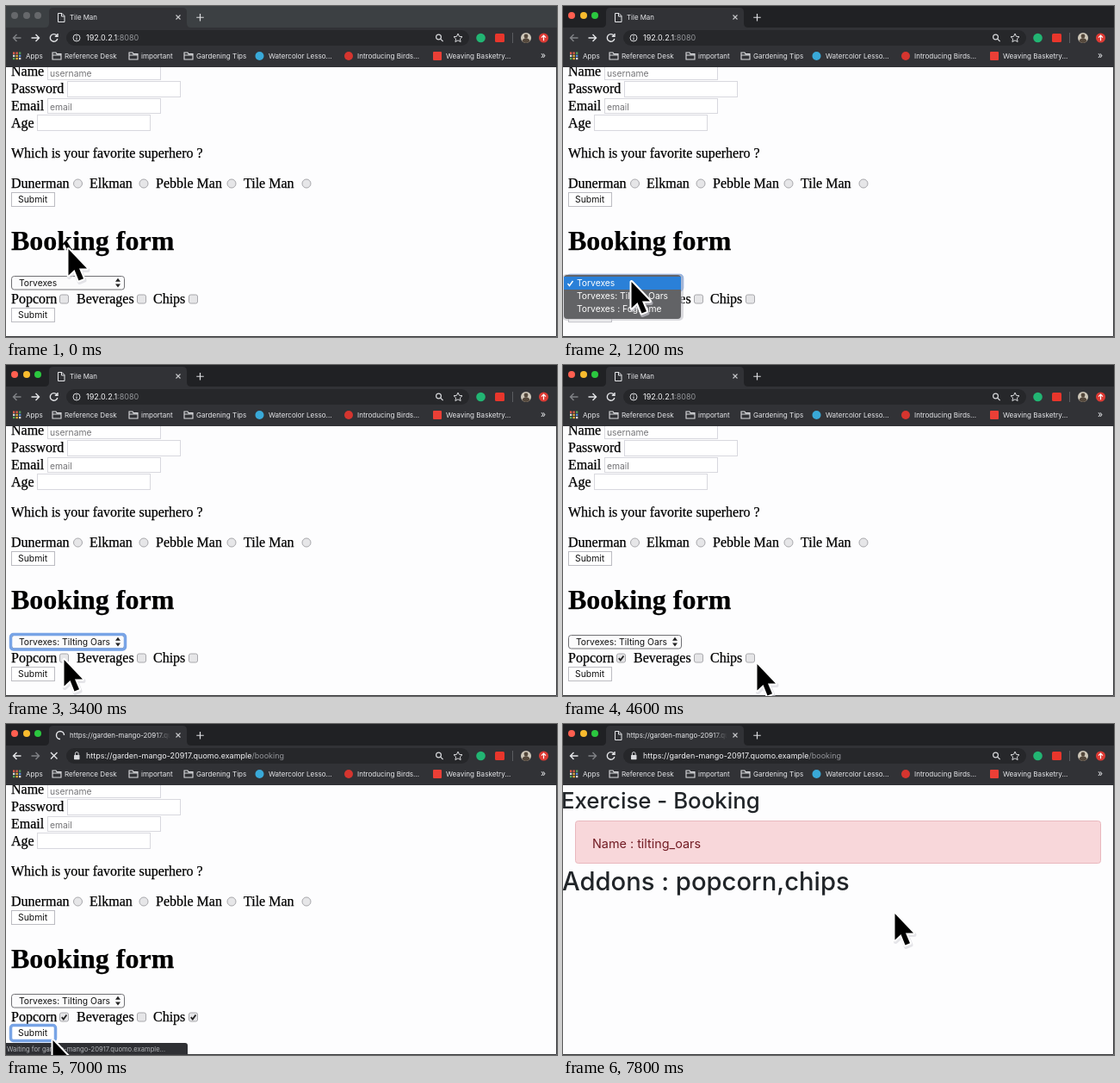
An HTML page that plays this animation: 640x384 px, repeating every 8000 ms.

```html
<!DOCTYPE html>
<html lang="en">
<head>
<meta charset="utf-8">
<title>Booking form</title>
<style>
  html, body { margin: 0; width: 100%; height: 100%; overflow: hidden; background: #fdfdfe; }
  svg { display: block; width: 100vw; height: 100vh; }
  text { white-space: pre; }
  .ui { font-family: Inter, Roboto, "Liberation Sans", sans-serif; }
  .serif { font-family: "Liberation Serif", "Times New Roman", serif; font-size: 16px; fill: #000; stroke: #000; stroke-width: .25px; }
</style>
</head>
<body>
<svg id="stage" viewBox="0 0 640 384" preserveAspectRatio="none"></svg>
<script>
const LOOP = 8000, STEP = 200;
const HOST = "garden-mango-20917.quomo.example";
const SITE = "https://" + HOST;
const MOVIES = ["Torvexes", "Torvexes: Tilting Oars", "Torvexes : Foghome"];
const LIGHT = "#e6e7ea", DIM = "#808286", BAR = "#313236";

const text = (x, y, s, size, fill, extra = "") =>
  `<text class="ui" x="${x}" y="${y}" font-size="${size}" fill="${fill}" ${extra}>${s}</text>`;
const serif = (x, y, s, extra = "") => `<text class="serif" x="${x}" y="${y}" ${extra}>${s}</text>`;
const rect = (x, y, w, h, fill, extra = "") =>
  `<rect x="${x}" y="${y}" width="${w}" height="${h}" fill="${fill}" ${extra}/>`;
const circle = (x, y, r, fill, extra = "") => `<circle cx="${x}" cy="${y}" r="${r}" fill="${fill}" ${extra}/>`;
const line = (d, color = LIGHT, w = 1.3, extra = "") =>
  `<path d="${d}" fill="none" stroke="${color}" stroke-width="${w}" ${extra}/>`;
const group = (id, body) => `<g id="${id}">${body}</g>`;

const input = (x, y, w, h) => rect(x + .5, y + .5, w, h, "#fff", 'stroke="#d8d8de"');
const radio = x => circle(x, 206, 5, "#e6e6e8", 'stroke="#a8a8ac"');
const button = y =>
  rect(6.5, y + .5, 50, 16, "#fff", 'stroke="#bcbcc2"') + text(14, y + 12, "Submit", 10.4, "#111");
const checkbox = (x, id) =>
  rect(x + .5, 335, 10, 10, "#e6e6e8", 'rx="2" stroke="#a8a8ac"') +
  (id ? line(`M${x + 2.8} 340.2l2 2.4 3.6-5.2`, "#222", 1.8, `id="${id}"`) : "");
const ring = (id, x, y, w, h) =>
  rect(x - 1, y - 1, w + 2, h + 2, "none", `id="${id}" rx="3" stroke="#78a4e6" stroke-width="3.5"`);
const folder = x => line(`M${x} 54h4l1 1.6h5v6.4h-10zM${x} 57h10`, "#dcdde0", 1.1);

function tabStrip() {
  const lights = [["#ff5f50", 10], ["#f8bb2e", 24], ["#2bc73f", 37]];
  return rect(0, 0, 640, 25, "#202124", 'id="strip"') +
    group("lights", lights.map(([c, x]) => circle(x, 11, 4, c)).join("")) +
    group("dimLights", lights.map(([, x]) => circle(x, 11, 4, "#66686b")).join("")) +
    `<path d="M45 25q5 0 5-5V7q0-5 5-5h150q5 0 5 5v13q0 5 5 5z" fill="${BAR}"/>` +
    line("M60.5 8.5h4.5l3 3v7h-7.5zM64.5 8.5v3.5h3.5", LIGHT, 1, 'id="doc"') +
    line("M63 8.5a4.5 4.5 0 1 1-4.5 4.5", LIGHT, 1.4, 'id="spinner"') +
    text(74, 16, "", 7.9, "url(#fade)", 'id="tabTitle"') +
    line("M197.5 10.5l5 5m0-5l-5 5", "#c8c9cc", 1.1) +
    line("M225.5 9v8.5m-4.25-4.25h8.5", "#dcdde0", 1.2);
}

function toolbar() {
  const apps = ["#e8604c", "#e8604c", "#58a55c", "#d8d8dc", "#e8b23c", "#5a8fe0", "#58a55c", "#e8b23c", "#d8d8dc"];
  const marks = [[23, "Apps"], [68, "Reference Desk"], [157, "important"], [221, "Gardening Tips"],
    [305, "Watercolor Lesso..."], [408, "Introducing Birds..."], [511, "Weaving Basketry..."]];
  return rect(0, 25, 640, 46, BAR) +
    rect(70, 28, 468, 18, "#26272a", 'rx="9"') +
    line("M17.5 37h-9m4-4l-4 4 4 4", LIGHT, 1.4, 'id="back"') +
    line("M29.5 37h9m-4-4l4 4-4 4", LIGHT, 1.4, 'id="forward"') +
    line("M59 34.2a4.3 4.3 0 1 0 .8 3.8M60 32v3.2h-3.2", LIGHT, 1.4, 'id="reload"') +
    line("M52 33l7.5 7.5m0-7.5l-7.5 7.5", LIGHT, 1.4, 'id="stop"') +
    group("info", circle(82, 37, 4, "none", 'stroke="#d8d9dc"') + line("M82 36.4v3M82 34.3v1.1", "#d8d9dc", 1.1)) +
    group("lock", rect(79, 36, 6.5, 5.2, "#d8d9dc", 'rx=".6"') + line("M80.4 36v-1.6a1.85 1.85 0 0 1 3.7 0v1.6", "#d8d9dc", 1)) +
    text(93, 40.3, `<tspan id="host"></tspan><tspan id="path" fill="#94969a"></tspan>`, 9, "#f4f4f6") +
    circle(502.5, 36, 2.9, "none", 'stroke="#d8d9dc" stroke-width="1.2"') + line("M504.6 38.1l3 3", "#d8d9dc", 1.3) +
    line("M525 32l1.5 3.3 3.5.4-2.6 2.4.7 3.5-3.1-1.8-3.1 1.8.7-3.5-2.6-2.4 3.5-.4z", "#d8d9dc", 1) +
    circle(551.5, 37, 5.3, "#22b573") + rect(568, 32, 11, 10, "#e8362c", 'rx="1.5"') +
    line("M588.5 31v12", "#5a5c60", 1) +
    circle(604, 37, 6, "#cfc8ba") + `<path d="M599.5 41a4.6 4.6 0 0 1 9 0a6 6 0 0 1-9 0z" fill="#54483c"/>` + circle(604, 35, 2.4, "#54483c") +
    circle(624.5, 37, 5.5, "#dd3a34") + line("M624.5 40.3v-6m-2.5 2.4l2.5-2.5 2.5 2.5", "#fff", 1.2) +
    apps.map((c, i) => rect(8 + i % 3 * 3.5, 53.5 + (i / 3 | 0) * 3.2, 2.3, 2.3, c)).join("") +
    folder(54) + folder(143) + folder(207) +
    circle(294.5, 58, 5, "#39a9d8") + circle(398, 58, 5, "#d5352f") + rect(496, 53, 10, 10, "#ea3f36", 'rx="1"') +
    marks.map(([x, s]) => text(x, 61, s, 8.1, LIGHT)).join("") +
    text(621, 61, "»", 10.3, LIGHT);
}

function form() {
  const fields = [["Name", 81], ["Password", 101], ["Email", 121], ["Age", 140.5]];
  const heroes = [[6, "Dunerman"], [97, "Elkman"], [174, "Pebble Man"], [276, "Tile Man"]];
  return input(48, 68, 131, 17) + input(71, 87, 131, 18) + input(48, 107, 131, 17) + input(36, 126, 131, 18) +
    fields.map(([s, y]) => serif(6, y, s)).join("") +
    text(51, 81.5, "username", 10.3, "#757578") + text(51, 120.5, "email", 10.3, "#757578") +
    serif(6, 176, "Which is your favorite superhero ?") +
    heroes.map(([x, s]) => serif(x, 211, s)).join("") +
    [83.5, 160, 262, 349].map(radio).join("") +
    button(216) +
    serif(6, 283, "Booking form", 'style="font-size:32px;font-weight:700"') +
    rect(6.5, 313.5, 131, 15.5, "#fbfbfc", 'rx="3" stroke="#707074"') +
    ring("selectRing", 6.5, 313.5, 131, 15.5) +
    text(15, 325, "", 10.3, "#111", 'id="choice"') +
    `<path d="M127 319.800l3-4 3 4zM127 322.600l3 4 3-4z" fill="#222"/>` +
    serif(6, 345, "Popcorn") + serif(82, 345, "Beverages") + serif(171, 345, "Chips") +
    checkbox(62, "popcorn") + checkbox(152) + checkbox(212, "chips") +
    button(350) + ring("submitRing", 6.5, 350.5, 50, 16) +
    group("menu",
      rect(-1, 311, 141, 54, "#c4c4ca", 'rx="5" opacity=".6"') +
      rect(1, 312, 136, 51, "#626366", 'rx="4"') +
      rect(1, 314, 136, 15, "#2a80d8", 'id="hover"') +
      line("M5.5 322l2 2.5 4-5.5", "#fff", 1.4) +
      MOVIES.map((s, i) => text(16, 325 + 15 * i, s, 10.3, "#fff")).join("")) +
    group("status", `<path d="M0 370h208q3 0 3 3v11h-211z" fill="#2f3034"/>` +
      text(1, 380, `Waiting for ${HOST}...`, 7.6, "#b2b4b8"));
}

function result() {
  return text(-2, 97.5, "Exercise - Booking", 25.8, "#212529", 'font-weight="500"') +
    rect(14.5, 112.5, 610, 49, "#f8d7da", 'rx="3" stroke="#e9b8be"') +
    text(34, 143.5, "Name : tilting_oars", 14.4, "#721c24") +
    text(-1, 192.5, "Addons : popcorn,chips", 29.2, "#212529", 'font-weight="500"');
}

const arrow = "M.5 1V31.500L7.500 25L12.500 37.500L18 35.200L13 23.500H22Z";
document.getElementById("stage").innerHTML =
  `<defs><linearGradient id="fade" gradientUnits="userSpaceOnUse" x1="74" y1="0" x2="191" y2="0">
    <stop offset=".85" stop-color="${LIGHT}"/><stop offset="1" stop-color="${LIGHT}" stop-opacity="0"/></linearGradient></defs>` +
  rect(0, 0, 640, 384, "#fdfdfe") + group("form", form()) + group("result", result()) +
  tabStrip() + toolbar() +
  line("M639.5 71V383.5H0", "#38393c", 1) +
  group("cursor",
    `<path d="${arrow}" transform="translate(1 2)" fill="none" stroke="#d4d4da" stroke-width="5" stroke-linejoin="round" opacity=".6"/>
     <path d="${arrow}" fill="#000" stroke="#fff" stroke-width="4" stroke-linejoin="round" paint-order="stroke"/>`);

const $ = id => document.getElementById(id);
const show = (id, on) => $(id).setAttribute("display", on ? "inline" : "none");
const set = (id, attrs) => Object.entries(attrs).forEach(([k, v]) => $(id).setAttribute(k, v));

// Cursor stops: time, x, y
const route = [[0, 72, 281], [800, 79, 319], [1400, 79, 319], [2200, 97, 341], [2600, 97, 341],
  [3400, 67, 341], [3800, 67, 341], [4600, 225, 346], [5000, 217, 341], [5200, 217, 341],
  [6000, 54, 364], [6400, 54, 366], [7200, 54, 366], [7800, 385, 219], [8000, 385, 219]];

function cursorAt(t) {
  const i = route.findIndex(p => p[0] > t);
  const [t0, x0, y0] = route[i - 1], [t1, x1, y1] = route[i];
  const u = (t - t0) / (t1 - t0), e = u * u * (3 - 2 * u);
  return [x0 + (x1 - x0) * e, y0 + (y1 - y0) * e];
}

function draw(t) {
  const active = t >= 600, loading = t >= 6400 && t < 7400, done = t >= 7400, remote = loading || done;
  const [x, y] = cursorAt(t);
  show("form", !done);
  show("result", done);
  show("lights", active);
  show("dimLights", !active);
  show("doc", !loading);
  show("spinner", loading);
  show("reload", !loading);
  show("stop", loading);
  show("info", !remote);
  show("lock", remote);
  show("status", loading && t >= 6600);
  show("menu", t >= 1000 && t < 2400);
  show("popcorn", t >= 3600);
  show("chips", t >= 5200);
  show("selectRing", t >= 1000 && t < 3600);
  show("submitRing", t >= 6200);
  set("strip", { fill: active ? "#202124" : "#3c4043" });
  set("back", { stroke: remote ? LIGHT : DIM });
  set("forward", { stroke: remote ? DIM : LIGHT });
  set("hover", { y: y < 329 ? 314 : 329 });
  set("spinner", { transform: `rotate(${t * .9 % 360} 63 13)` });
  set("cursor", { transform: `translate(${x} ${y})` });
  $("choice").textContent = MOVIES[t < 2600 ? 0 : 1];
  $("tabTitle").textContent = remote ? SITE.slice(0, 30) : "Tile Man";
  $("host").textContent = remote ? SITE : "192.0.2.1";
  $("path").textContent = remote ? "/booking" : ":8080";
}

const start = performance.now();
function tick() {
  const t = (performance.now() - start) % LOOP;
  draw(Math.floor(t / STEP) * STEP);
  requestAnimationFrame(tick);
}
tick();
</script>
</body>
</html>
```
